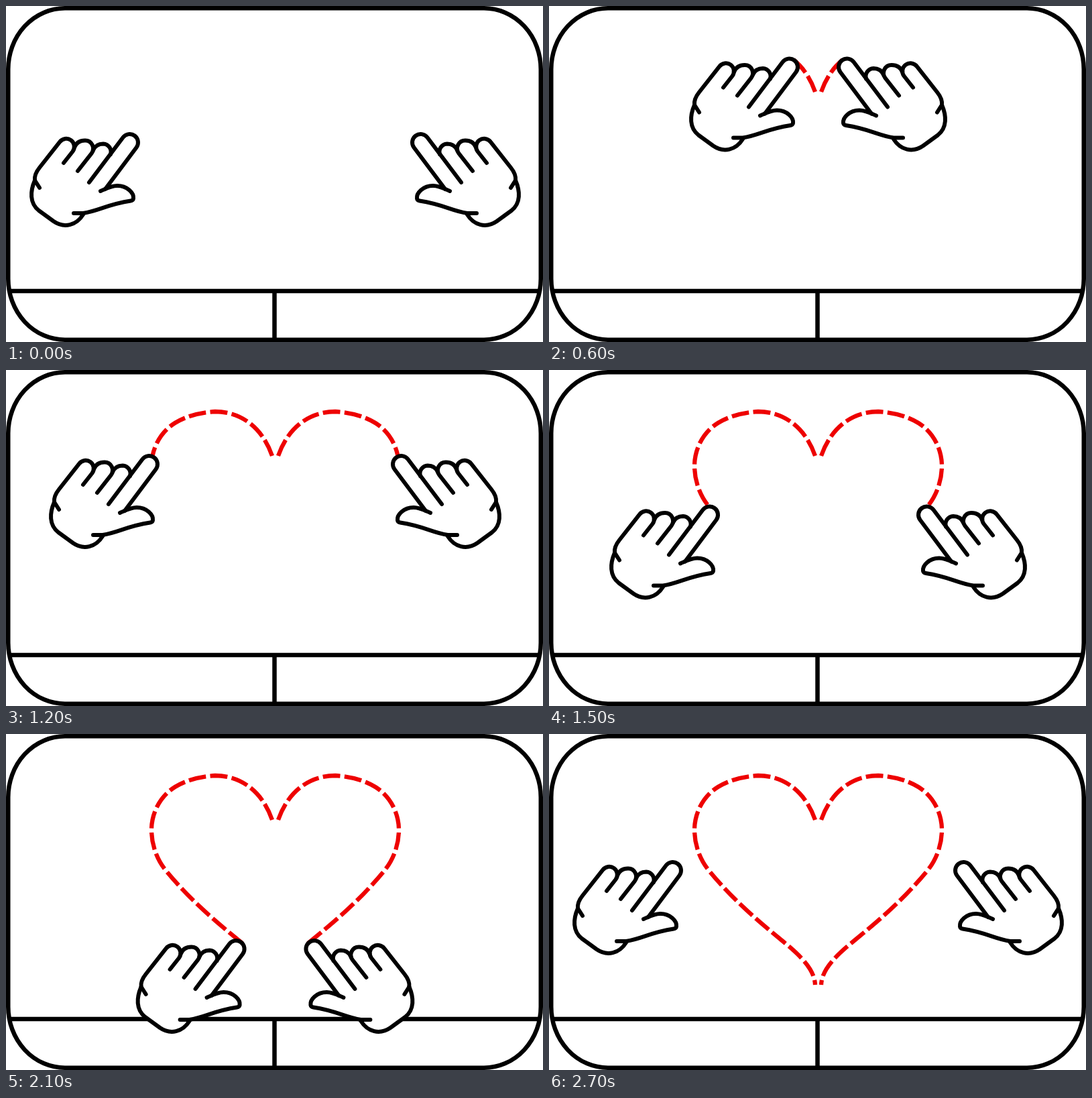
An HTML page with a canvas for the animation above (3 s loop, 801 px wide and 501 px high).

```html
<!DOCTYPE html>
<html lang="en">
<head>
<meta charset="utf-8">
<title>Heart gesture</title>
<style>
html, body { margin: 0; width: 100%; height: 100%; overflow: hidden; background: #fff; }
canvas { display: block; }
</style>
</head>
<body>
<canvas id="stage" width="801" height="501"></canvas>
<script>
const ctx = document.getElementById('stage').getContext('2d');
const STEP = 300;
const MIRROR = 803;

// Per step: hand offset x, y and number of dashes drawn
const poses = [
  [0, 0, 0], [200, -71, 0], [174, -112.5, 2], [79, -128, 5], [29, -63, 8],
  [55, 12.5, 10], [111, 76, 13], [158.6, 117, 15], [200, 167, 17], [0, 0, 18]
];

const pad = new Path2D(
  'M88 3.25H713A84.75 91 0 0 1 797.75 94.25V406.75A84.75 91 0 0 1 713 497.75' +
  'H88A84.75 91 0 0 1 3.25 406.75V94.25A84.75 91 0 0 1 88 3.25Z' +
  'M5 425H796M400.5 425V497');

const palm = new Path2D('M45 258L80 203L100 212L128 219L155 223L148 273L115 310L60 300Z');
const parts = [
  'M115 311C105 327 87 332 71 321L49 305C35 294 36 276 43 260',
  'M50 271L43 260C42 252 46 246 50 241L80.2 202.6A12 12 0 0 1 99.4 217L86 234',
  'M102 211C105 203 112 200.5 118 200.5A12 12 0 0 1 127.6 219.7L107 246',
  'M130 215C133 208 139 205.5 145 205.5A12 12 0 0 1 156 221',
  'M141 276C150 272 157 268 166 268C181 268 191 279 190 287Q189.5 290 186 290.5C150 296 140 305 115 309L101 309',
  'M124 263L174.5 196A12.5 12.5 0 0 1 194.5 211L148 273'
].map(d => new Path2D(d));

const heartData = 'M397 128C380 80 345 62 312 62C290 63 268 69 252 79C228 94 217 120 217 143' +
  'C217 165 225 187 238 203C275 248 310 277 350 310C378 333 396 352 397 374';
const heart = new Path2D(heartData);
const ruler = document.createElementNS('http://www.w3.org/2000/svg', 'path');
ruler.setAttribute('d', heartData);
const period = (ruler.getTotalLength() - 7.5) / 17;
const gap = 6.4;

function drawPad() {
  ctx.strokeStyle = '#000';
  ctx.lineWidth = 6.5;
  ctx.lineCap = 'butt';
  ctx.stroke(pad);
}

function drawTrail(count) {
  if (!count) return;
  const dashes = [];
  for (let i = 0; i < count; i++) dashes.push(period - gap, i < count - 1 ? gap : 9999);
  ctx.strokeStyle = '#ee0000';
  ctx.lineWidth = 6.3;
  ctx.lineCap = 'butt';
  ctx.setLineDash(dashes);
  ctx.stroke(heart);
  ctx.setLineDash([]);
}

function drawHand(x, y) {
  ctx.save();
  ctx.translate(x, y);
  ctx.fillStyle = '#fff';
  ctx.strokeStyle = '#000';
  ctx.lineWidth = 6;
  ctx.lineCap = ctx.lineJoin = 'round';
  ctx.fill(palm);
  parts.forEach(p => ctx.fill(p));
  parts.forEach(p => ctx.stroke(p));
  ctx.restore();
}

function drawHalf([x, y, count]) {
  drawTrail(count);
  drawHand(x, y);
}

function render(now) {
  const pose = poses[Math.floor(now / STEP) % poses.length];
  ctx.fillStyle = '#fff';
  ctx.fillRect(0, 0, 801, 501);
  drawPad();
  drawHalf(pose);
  ctx.save();
  ctx.translate(MIRROR, 0);
  ctx.scale(-1, 1);
  drawHalf(pose);
  ctx.restore();
}

const start = performance.now();
function tick() {
  render(performance.now() - start);
  requestAnimationFrame(tick);
}
tick();
</script>
</body>
</html>
```
